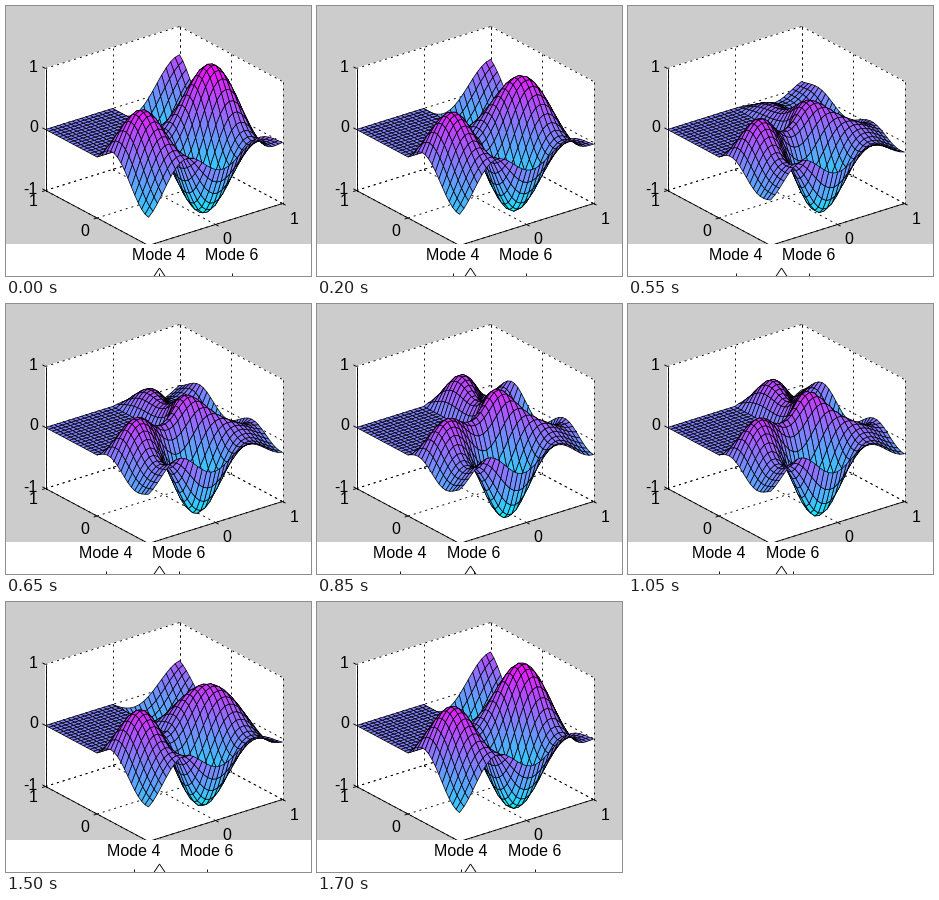
These frames come from a looping animation (305x270 px, 1750 ms). A matplotlib script:

```python
import math

import numpy as np
import matplotlib.pyplot as plt
from matplotlib.animation import FuncAnimation
from matplotlib.collections import PolyCollection
from matplotlib.patches import Polygon, Rectangle

W, H, DPI = 305, 270, 100
PX = 72 / DPI
FRAMES, STEP_MS, HALF = 35, 50, 18
M = 15                       # grid cells per unit length
POINTER, SPACING = 153, 73.25

plt.rcParams["font.family"] = "Liberation Sans"
plt.rcParams["font.size"] = 16 * PX
plt.rcParams["lines.scale_dashes"] = False


def bessel(a, x):
    """Bessel function of the first kind, by its power series."""
    h = np.asarray(x, float) / 2
    return sum((-1) ** k / (math.factorial(k) * math.gamma(k + a + 1))
               * h ** (2 * k + a) for k in range(45))


def polar(x, y):
    """Radius and angle about the re-entrant corner of the L."""
    return np.hypot(x, y), np.arctan2(-y, -x) % (2 * np.pi)


def eigenmode(lam, orders):
    """Two leading terms of an L-shaped membrane eigenfunction."""
    mu = math.sqrt(lam)
    alpha = [2 * n / 3 for n in orders]
    t = np.arange(1, 3 * M + 1) * np.pi / (4 * M)
    r = 1 / np.maximum(abs(np.cos(t)), abs(np.sin(t)))
    A = np.column_stack([bessel(a, mu * r) * np.sin(a * t) for a in alpha])
    norms = np.linalg.norm(A, axis=0)
    c = np.linalg.svd(A / norms)[2][-1] / norms
    c = c * np.sign(c[1])

    r, t = polar(GX, GY)
    z = sum(c[j] * bessel(alpha[j], mu * r) * np.sin(alpha[j] * t)
            for j in range(2))
    z = np.where(t > 1.5 * np.pi + 1e-9, 0, z)
    return z / abs(z).max()


def project(x, y, z):
    return np.stack([157.5 + 67 * x - 51.5 * y,
                     129.5 - 21 * x - 27.5 * y - 61 * z], axis=-1)


grid = np.arange(-M, M + 1) / M
GX, GY = np.meshgrid(grid, grid, indexing="ij")
MODE_A = eigenmode(29.5214811, [2, 4, 8, 10, 14, 16, 20, 22, 26])
MODE_B = eigenmode(41.4745099, [1, 5, 7, 11, 13, 17, 19, 23, 25])

fig = plt.figure(figsize=(W / DPI, H / DPI), dpi=DPI, facecolor="#cccccc")
ax = fig.add_axes([0, 0, 1, 1])
ax.set_xlim(-0.5, W - 0.5)
ax.set_ylim(H - 0.5, -0.5)
ax.axis("off")


def segment(p, q, z=2, **style):
    return ax.plot([p[0], q[0]], [p[1], q[1]], color="black", lw=0.9 * PX,
                   solid_capstyle="butt", zorder=z, **style)[0]


def label(x, y, s):
    return ax.text(x, y, s, ha="center", va="center_baseline", zorder=8)


def line3(a, b, **style):
    segment(project(*a), project(*b), **style)


# Box walls, grid lines and axes
outline = [(-1, 1, -1), (-1, 1, 1), (1, 1, 1), (1, -1, 1), (1, -1, -1),
           (-1, -1, -1)]
ax.add_patch(Polygon([project(*p) for p in outline], fc="white", ec="none",
                     antialiased=False, zorder=1))
dots = dict(linestyle=(0, (2 * PX, 4 * PX)), dash_capstyle="butt")
for v in (-1, 0, 1):
    line3((v, 1, -1), (v, 1, 1), **dots)
    line3((1, v, -1), (1, v, 1), **dots)
    line3((-1, 1, v), (1, 1, v), **dots)
    line3((1, 1, v), (1, -1, v), **dots)
    line3((v, -1, -1), (v, 1, -1), **dots)
    line3((-1, v, -1), (1, v, -1), **dots)
    # ticks
    line3((-1, 1, v), (-1, 1.06, v))
    line3((v, -1, -1), (v, -1.06, -1))
    line3((-1, v, -1), (-1.05, v, -1))
line3((-1, 1, -1), (-1, 1, 1))
line3((-1, 1, -1), (-1, -1, -1))
line3((-1, -1, -1), (1, -1, -1))

for x, y, s in [(27, 59, "1"), (27, 120, "0"), (24, 181, "-1"),
                (27, 194, "1"), (78, 224, "0"),
                (220, 232, "0"), (288, 211, "1")]:
    label(x, y, s)

surface = PolyCollection([], edgecolors="black", linewidths=0.7 * PX,
                         zorder=4)
ax.add_collection(surface, autolim=False)

# Mode slider
ax.add_patch(Rectangle((-0.5, 237.5), W, H - 237.5, fc="white", ec="none",
                       antialiased=False, zorder=6))
for foot in (147, 159):
    segment((POINTER, 261.5), (foot, 270.5), z=7)
names = [label(POINTER, 247, s) for s in ("Mode 4", "Mode 6")]
ticks = [segment((POINTER, 266.5), (POINTER, 270), z=7) for _ in names]


def draw(k):
    slide = 1 - abs(1 - k / HALF)
    mix = (1 - math.cos(math.pi * slide)) / 2
    z = (1 - mix) * MODE_A + mix * MODE_B
    p = project(GX, GY, z)
    quads = np.stack([p[:-1, :-1], p[1:, :-1], p[1:, 1:], p[:-1, 1:]], axis=2)
    # far cells first
    surface.set_verts(quads[::-1, ::-1].reshape(-1, 4, 2))
    level = np.clip((z[:-1, :-1][::-1, ::-1].ravel() + 1) / 2, 0, 1)
    surface.set_facecolor(np.column_stack([level, 1 - level,
                                           np.ones_like(level)]))
    for i, (name, tick) in enumerate(zip(names, ticks)):
        x = math.floor(POINTER + SPACING * (i - slide)) - 1
        name.set_x(x)
        tick.set_xdata([x, x])
    return [surface, *names, *ticks]


anim = FuncAnimation(fig, draw, frames=FRAMES, interval=STEP_MS,
                     repeat=True, repeat_delay=0, blit=False)
plt.show()
```
